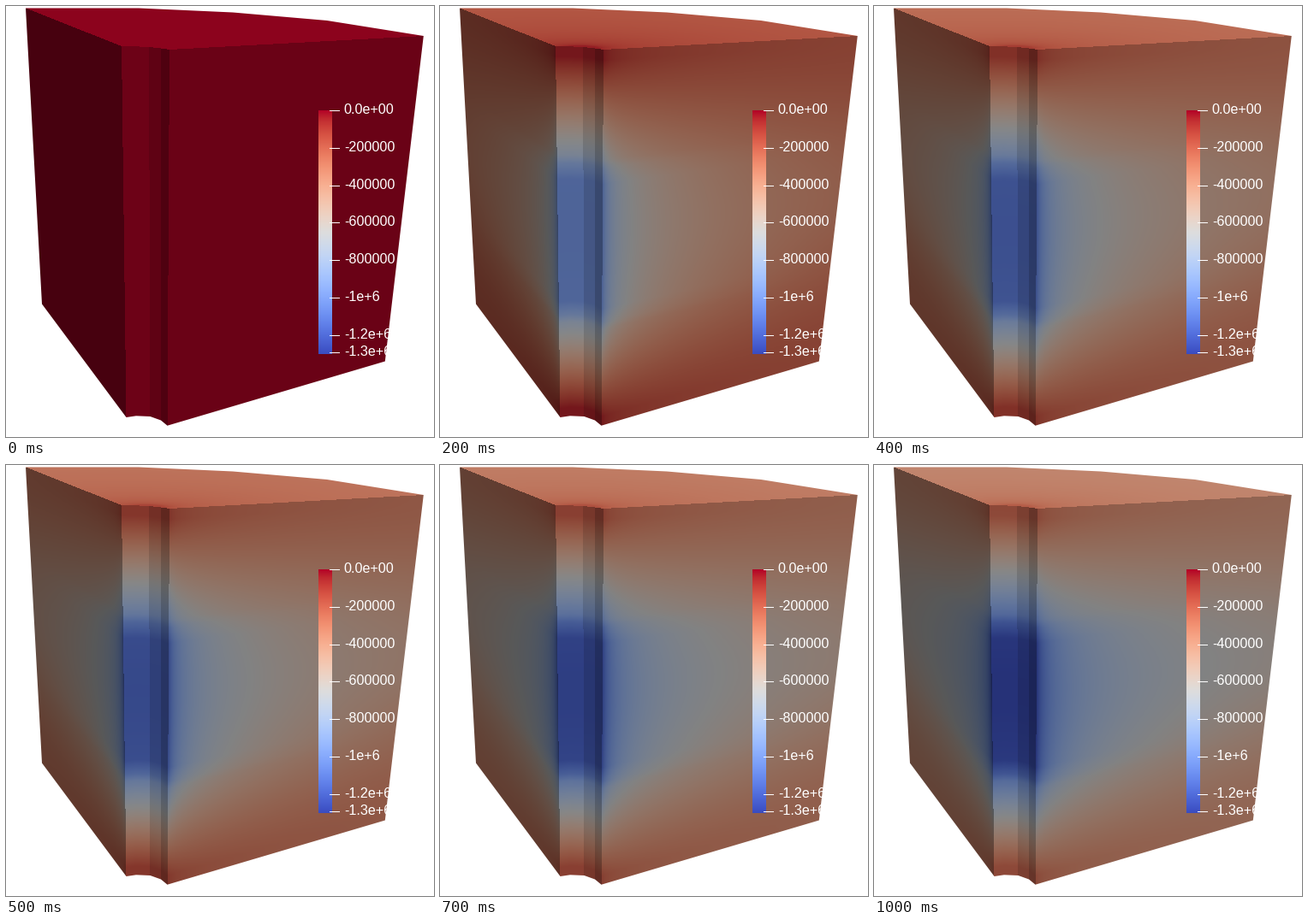
Recreate the animation shown at these times as a matplotlib script. Size 500 by 504 pixels, loop 1100 ms.

```python
import numpy as np
import matplotlib.pyplot as plt
from matplotlib.animation import FuncAnimation
from matplotlib.patches import Polygon, Rectangle

W, H, DPI = 500, 504, 100
FRAMES, STEP_MS = 11, 100
CMAP = plt.get_cmap("coolwarm", 1024)

# Corners of the side faces from left to right, and the far rim of the lid
TOPS = [(23, 2.5), (135, 47), (151, 47.3), (167, 48), (181, 49.5),
        (191, 51), (487.8, 35)]
BOTTOMS = [(42, 348.5), (140.5, 481), (152, 479.3), (168.5, 480),
           (181, 484.5), (188.5, 490.7), (442.8, 415.5)]
RIM = [(375, 17), (265, 7.5), (155, 2.5)]
SHADES = [0.40, 0.61, 0.61, 0.53, 0.44, 0.59]
LID_SHADE = 0.78

X, Y = np.meshgrid(np.arange(W) + 0.5, np.arange(H) + 0.5)


def line_x(p, q):
    return p[0] + (Y - p[1]) * (q[0] - p[0]) / (q[1] - p[1])


def line_y(p, q):
    return p[1] + (X - p[0]) * (q[1] - p[1]) / (q[0] - p[0])


def pressure_drop(dist, depth):
    """Drop after the first step, and its growth rate in log time."""
    dist, depth = np.clip(dist, 0, 1), np.clip(depth, 0, 1)
    mid = 0.535
    u = np.abs(depth - mid) / np.where(depth < mid, mid, 1 - mid)
    bump = np.sin(np.pi * depth) ** 2
    far = 0.095 + 0.085 * bump
    bore = (np.clip(1.08 * (0.92 - u), -0.03, 0.55)
            + 0.15 * np.clip((0.45 - u) / 0.12, 0, 1))
    near = 1 - np.log1p(76 * dist) / np.log(77)
    return far + (bore - far) * near, 0.088 + 0.036 * bump


def build_scene():
    base, rate, shade = (np.zeros((H, W)) for _ in range(3))
    lid_front = np.full((H, W), -1.0)
    last = len(SHADES) - 1
    for i, face_shade in enumerate(SHADES):
        (t0, t1), (b0, b1) = TOPS[i:i + 2], BOTTOMS[i:i + 2]
        xl, xr = line_x(t0, b0), line_x(t1, b1)
        yt, yb = line_y(t0, t1), line_y(b0, b1)
        across = (X - xl) / (xr - xl)
        dist = {0: 1 - across, last: across}.get(i, 0 * across)
        drop, growth = pressure_drop(dist, (Y - yt) / (yb - yt))
        inside = (X >= xl) | (i == 0)
        base[inside], rate[inside] = drop[inside], growth[inside]
        shade[inside] = face_shade
        span = (X >= t0[0]) & (X <= t1[0])
        lid_front[span] = yt[span]

    # Lid: skewed ground axes along its two straight sides
    (lx, ly), (rx, ry) = (-112, -44), (296, -16)
    dx, dy = X - 165, Y - 49
    det = lx * ry - rx * ly
    a = (ry * dx - rx * dy) / det
    c = (lx * dy - ly * dx) / det
    dist = np.sqrt(np.maximum(a * a + c * c + 0.3 * a * c, 0)) - 0.06
    drop, growth = pressure_drop(dist, 0 * dist)
    lid = Y < lid_front
    base[lid], rate[lid], shade[lid] = drop[lid], growth[lid], LID_SHADE
    return base, rate, shade


BASE, RATE, SHADE = build_scene()


def render(step):
    drop = BASE + RATE * np.log(step) if step else np.zeros((H, W))
    rgb = CMAP(np.clip(1 - drop, 0, 1))[..., :3]
    return rgb * SHADE[..., None]


fig = plt.figure(figsize=(W / DPI, H / DPI), dpi=DPI, facecolor="white")
ax = fig.add_axes([0, 0, 1, 1])
ax.axis("off")

block = ax.imshow(render(0), extent=(0, W, H, 0), interpolation="nearest")
outline = BOTTOMS + [TOPS[-1]] + RIM + [TOPS[0]]
block.set_clip_path(Polygon(outline, closed=True, transform=ax.transData))

# Colour bar with its scale
BAR_TOP, BAR_LEN, LOWEST = 122, 284, 1.293e6
ax.imshow(np.linspace(1, 0, BAR_LEN)[:, None], cmap=CMAP, vmin=0, vmax=1,
          extent=(365, 381, BAR_TOP + BAR_LEN + 1, BAR_TOP),
          interpolation="nearest", zorder=2)


def label(value):
    if value == 0:
        return "0.0e+00"
    return f"-{value}" if value < 1e6 else f"-{value / 1e6:.2g}e+6"


for value in [*range(0, 1_200_001, 200_000), LOWEST]:
    y = round(BAR_TOP + (BAR_LEN - 1) * value / LOWEST)
    ax.add_patch(Rectangle((378, y), 12, 1, color="white", lw=0, zorder=3))
    ax.text(394.8, y + 4.4, label(value), color="white",
            family="Liberation Sans", size=16.1 * 72 / DPI,
            va="baseline", zorder=3)

ax.set_xlim(0, W)
ax.set_ylim(H, 0)
ax.set_aspect("auto")


def update(step):
    block.set_data(render(step))
    return [block]


anim = FuncAnimation(fig, update, frames=FRAMES, interval=STEP_MS,
                     repeat=True, repeat_delay=0, blit=False)
plt.show()
```
